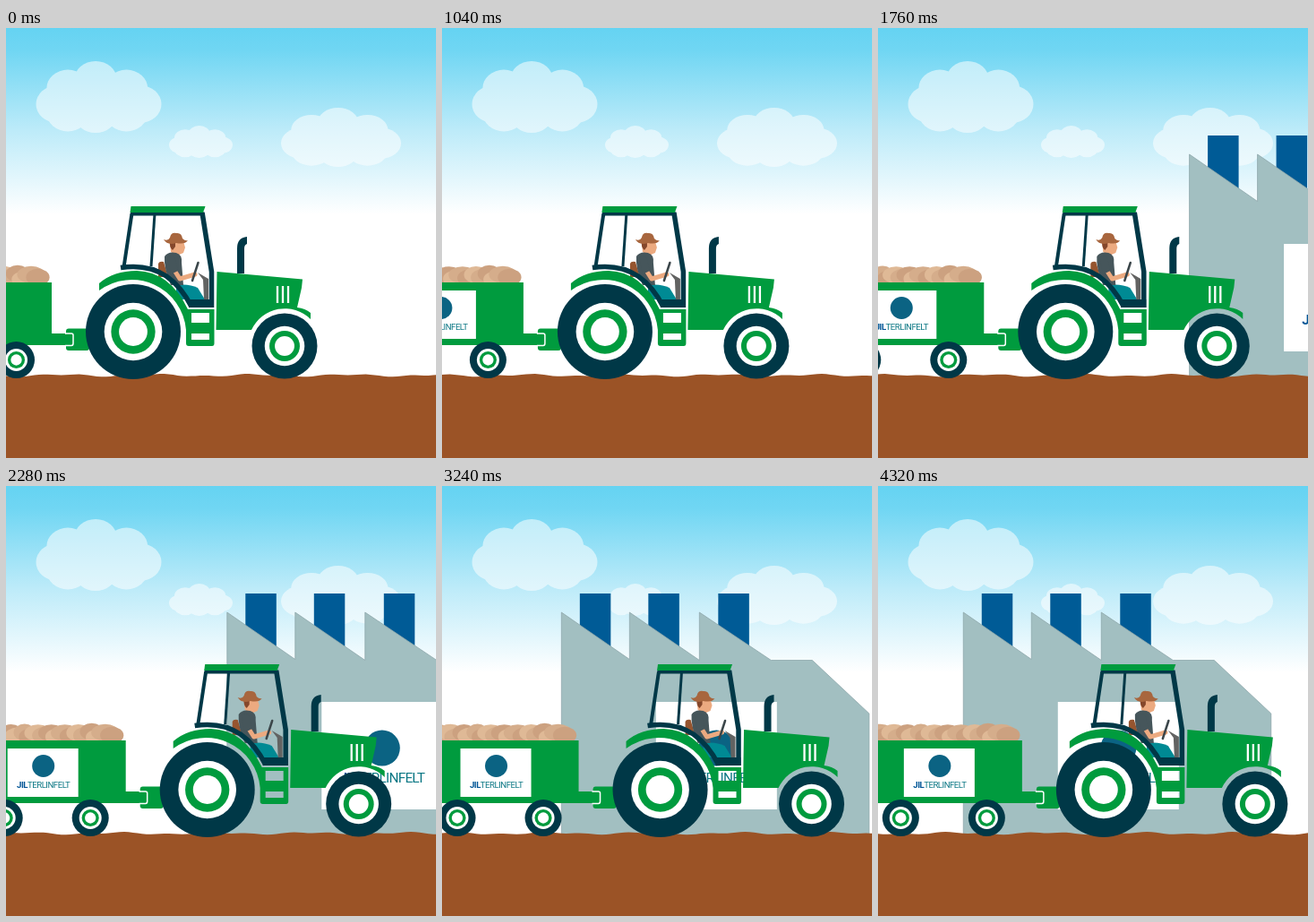
An HTML page for the animation above (6000 ms loop, 480x480 px).

```html
<!DOCTYPE html>
<html lang="en">
<head>
<meta charset="utf-8">
<title>Harvest tractor</title>
<style>
html, body { margin: 0; width: 100%; height: 100%; overflow: hidden; background: #fff; }
svg { display: block; width: 100%; height: 100%; }
text { font: 400 9.6px Roboto, Arial, sans-serif; letter-spacing: -.05em; text-anchor: middle; fill: #0b7784; }
tspan { font-weight: 700; fill: #005596; }
</style>
</head>
<body>
<svg viewBox="0 0 480 480">
  <defs>
    <linearGradient id="sky" x2="0" y2="1">
      <stop stop-color="#65d3f2"/>
      <stop offset=".12" stop-color="#70d6f3"/>
      <stop offset=".55" stop-color="#bdebf9"/>
      <stop offset="1" stop-color="#fff"/>
    </linearGradient>
    <g id="brand">
      <circle cy="-24" r="12.5" fill="#0b6383"/>
      <text><tspan>JIL</tspan>TERLINFELT</text>
    </g>
  </defs>
  <rect width="480" height="480" fill="#fff"/>
  <rect width="480" height="208" fill="url(#sky)"/>
  <g id="clouds" fill="#fff"></g>

  <g id="factory">
    <path fill="#005b96" d="M115.500 120h34.500v75h-34.500zM192 120h34.500v75h-34.500zM270 120h34.500v75h-34.500z"/>
    <path fill="#a2bfc1" stroke="#8ea8ab" stroke-width=".8" d="M95 390V141L171 193.500V141L249 194.500V141L329 194.500H375L438.500 254V390Z"/>
    <path fill="#fff" d="M200.500 241h135v120h-135z"/>
    <use href="#brand" transform="translate(268 331) scale(1.6)"/>
  </g>

  <path id="ground" fill="#9b5326"/>

  <g id="rig">
    <!-- trailer -->
    <g id="potatoes"></g>
    <path fill="#009b3e" d="M-130 284H51V341H66V354H-130Z"/>
    <rect x="67" y="335.500" width="26" height="24.500" rx="3" fill="#009b3e"/>
    <rect x="50" y="341.500" width="25" height="12.500" rx="2" fill="#009b3e"/>
    <path fill="none" stroke="#fff" stroke-width="1.500" d="M66 341H73Q75 341 75 343V352Q75 354.500 73 354.500H66"/>
    <path fill="#fff" d="M-81 293h79v54h-79z"/>
    <use href="#brand" transform="translate(-41 336.500)"/>

    <!-- driver -->
    <path fill="#96552f" d="M170 263Q171 260 176 261L181 278H170Z"/>
    <path fill="#008a94" d="M190 287Q204 285 214 290L222 303H190Z"/>
    <path fill="#ecaa80" d="M183 238H198L200 245L198 251L191 254L184 250Z"/>
    <path fill="#85472b" d="M183 238H189V244L186 248Q182 245 183 238Z"/>
    <path fill="#46565b" d="M177 255Q181 249 190 251Q197 253 196 262L198 287H184Q176 268 177 255Z"/>
    <path fill="none" stroke="#ecaa80" stroke-width="5" stroke-linecap="round" stroke-linejoin="round" d="M187 269L194 280L211 275"/>
    <path fill="#46565b" d="M180 255Q186 252 189 258L192 271L184 275Z"/>
    <path fill="#a8663e" d="M176 236Q181 238 183 234Q184 228 190 229Q196 228 197 235Q200 238 203 237Q200 242 190 240Q180 243 176 236Z"/>
    <path fill="#626362" d="M214 273L226 280V303H221L220 281Z"/>
    <path stroke="#3b464a" stroke-width="2.500" stroke-linecap="round" d="M208 282L214.500 262"/>

    <!-- cab -->
    <g fill="none" stroke="#003847">
      <path stroke-width="4" d="M140.500 207L131.500 267"/>
      <path stroke-width="3" d="M166 207L162 266"/>
      <path stroke-width="4" d="M139 207.500H221"/>
      <path stroke-width="5.500" d="M219 206L229.500 272V312"/>
      <path stroke-width="9" d="M204 307.500H232"/>
      <path stroke-width="5.500" d="M128 267.500Q158 263 179 277Q196 289 207 311"/>
    </g>
    <path fill="#009b3e" d="M139.500 199H222.500L220 206H138.500Z"/>
    <path fill="#003847" d="M258 274V246Q258 234 269 233V241Q266 242 266 246V274Z"/>

    <!-- fender, step and hood -->
    <path fill="#009b3e" fill-rule="evenodd" d="M104 293V285Q120 271 146 271Q183 272 203 314H232.500V352Q232.500 355 230 355H204Q201 355 201 352V337A61 61 0 0 0 104 293Z
      M207 318V329H227V318ZM207 341V348H227V341Z"/>
    <path fill="#009b3e" d="M235.500 272L331 280.500L330 290L325 312Q334 313 340 318V325A41 41 0 0 0 274 337H234.500Z"/>
    <path stroke="#fff" stroke-width="2.300" d="M303 288V307M309 288V307M315 288V307"/>
    <g id="wheels"></g>
  </g>
</svg>
<script>
const LOOP = 6000, STOP = 4320, EASE = 4480, STEP = 40;
const el = id => document.getElementById(id);
const ellipse = (x, y, rx, ry, fill) => `<ellipse cx="${x}" cy="${y}" rx="${rx}" ry="${ry}" fill="${fill}"/>`;

let seed = 7;
const random = () => (seed = seed * 16807 % 2147483647) / 2147483647;

// Eight overlapping puffs around a centre, w and h being half the cloud's size
function cloud(x, y, w, h) {
  let puffs = ellipse(x, y, w * .7, h * .7, '#fff');
  for (let a = 0; a < 8; a++) {
    const c = Math.cos(a * Math.PI / 4), s = Math.sin(a * Math.PI / 4);
    puffs += ellipse(x + w * (.66 * c - .05 * s * s), y + h * (.48 * s + .2 * c * c), w * .34, h * .52, '#fff');
  }
  return `<g opacity=".54">${puffs}</g>`;
}
el('clouds').innerHTML = cloud(103.5, 77, 70, 40) + cloud(217.5, 127, 35.5, 18) + cloud(374, 122, 67, 33);

function potatoes() {
  const tones = ['#cca180', '#dfb996', '#d5ad8b'];
  let heap = '';
  for (let i = 0; i < 22; i++) {
    const x = -122 + i * 7.5;
    heap += ellipse(x, 273 + (i % 2) * 5 + random() * 3, 12 + random() * 4, 9.5, tones[i % 3]);
  }
  return heap;
}
el('potatoes').innerHTML = potatoes();

const wheel = (x, y, r) => ellipse(x, y, r, r, '#003847') + ellipse(x, y, r * .61, r * .61, '#fff')
  + ellipse(x, y, r * .465, r * .465, '#009b3e') + ellipse(x, y, r * .3, r * .3, '#fff');
el('wheels').innerHTML = wheel(142, 339, 53) + wheel(311, 355, 36.5)
  + wheel(11.5, 370.5, 20.5) + wheel(-84.5, 370.5, 20.5);

let edge = 'M-860 490';
for (let x = -860; x <= 500; x += 5)
  edge += `L${x} ${(387.7 + Math.sin(x / 17) + .7 * Math.sin(x / 7.3 + 1)).toFixed(1)}`;
el('ground').setAttribute('d', edge + 'V490Z');

const shift = (id, x) => el(id).setAttribute('transform', `translate(${x.toFixed(2)})`);

function draw(now) {
  const t = Math.min(Math.floor(now % LOOP / STEP) * STEP, STOP);
  const left = 1 - t / EASE;
  const scenery = 836.6 * left ** 2.4;
  shift('rig', 110 * (1 - left ** 2 * (1 + left ** 4 * (1 - left))));
  shift('factory', scenery);
  shift('ground', scenery);
}

function tick() {
  draw(performance.now());
  requestAnimationFrame(tick);
}
tick();
</script>
</body>
</html>
```
